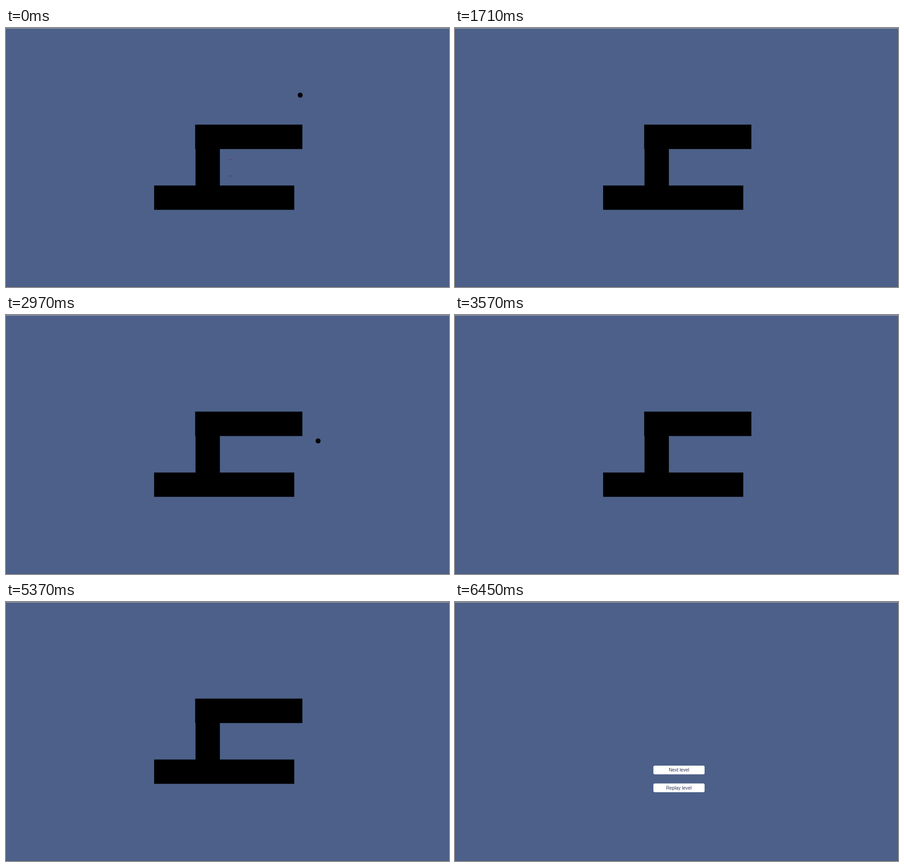
These frames come from a looping animation (978 by 573 pixels, 6480 ms). An HTML page:

```html
<!DOCTYPE html>
<html lang="en">
<head>
<meta charset="utf-8">
<title>Ball level</title>
<style>
  html, body { margin: 0; width: 100%; height: 100%; overflow: hidden; background: #4c6089; }
  svg { display: block; width: 978px; height: 573px; }
  text { font: 10.3px "Liberation Sans", Arial, sans-serif; fill: #2b3557; text-anchor: middle; }
</style>
</head>
<body>
<svg viewBox="0 0 978 573">
  <rect width="978" height="573" fill="#4c6089"/>
  <rect width="1" height="573" fill="#43567c"/>
  <rect x="977" width="1" height="573" fill="#43567c"/>
  <rect y="572" width="978" height="1" fill="#465981"/>
  <rect width="978" height="1.4" fill="#9a9ea8"/>
  <g id="level">
    <path d="M417.6 213.8H654.3V267.8H472.2V348.6H636.4V402.2H327V348.6H418.4V267.8H417.6Z"/>
    <g id="specks">
      <path d="M493 292V290.5H497V292" fill="none" stroke="#7a2a3a"/>
      <path d="M493 327.5H497" stroke="#30283c"/>
    </g>
    <circle id="ball" r="5.5"/>
  </g>
  <g id="menu">
    <rect x="438" y="362" width="113" height="19.3" rx="3" fill="#fff"/>
    <rect x="438" y="401.5" width="113" height="19.3" rx="3" fill="#fff"/>
    <text x="494.5" y="375.3">Next level</text>
    <text x="494.2" y="414.8">Replay level</text>
  </g>
</svg>
<script>
  const LOOP = 6480, MENU_AT = 5400, STEP = 30;
  const [level, specks, ball, menu] =
    ["level", "specks", "ball", "menu"].map(id => document.getElementById(id));

  // time, x, y: the black ball is unseen while it is over the walls
  const path = [
    [0, 649.5, 148.5], [450, 649.5, 148.5], [1080, 630, 240],
    [2040, 642, 248], [2460, 676, 266], [2670, 676, 266],
    [2790, 689, 278.5], [3060, 689, 278.5], [3570, 622, 374],
    [LOOP, 600, 376]
  ];

  function place(t) {
    const i = path.findIndex(p => p[0] > t);
    const [t0, x0, y0] = path[i - 1], [t1, x1, y1] = path[i];
    const k = (t - t0) / (t1 - t0), e = k * k * (3 - 2 * k);
    return [x0 + (x1 - x0) * e, y0 + (y1 - y0) * e];
  }

  function show(el, on) {
    el.style.display = on ? "" : "none";
  }

  function draw(now) {
    const t = Math.floor(now % LOOP / STEP) * STEP;
    const [x, y] = place(t);
    ball.setAttribute("cx", x);
    ball.setAttribute("cy", y);
    specks.style.opacity = Math.max(0, Math.min(1, (270 - t) / 210));
    show(level, t < MENU_AT);
    show(menu, t >= MENU_AT);
  }

  const start = performance.now();
  function tick() {
    draw(performance.now() - start);
    requestAnimationFrame(tick);
  }
  tick();
</script>
</body>
</html>
```
